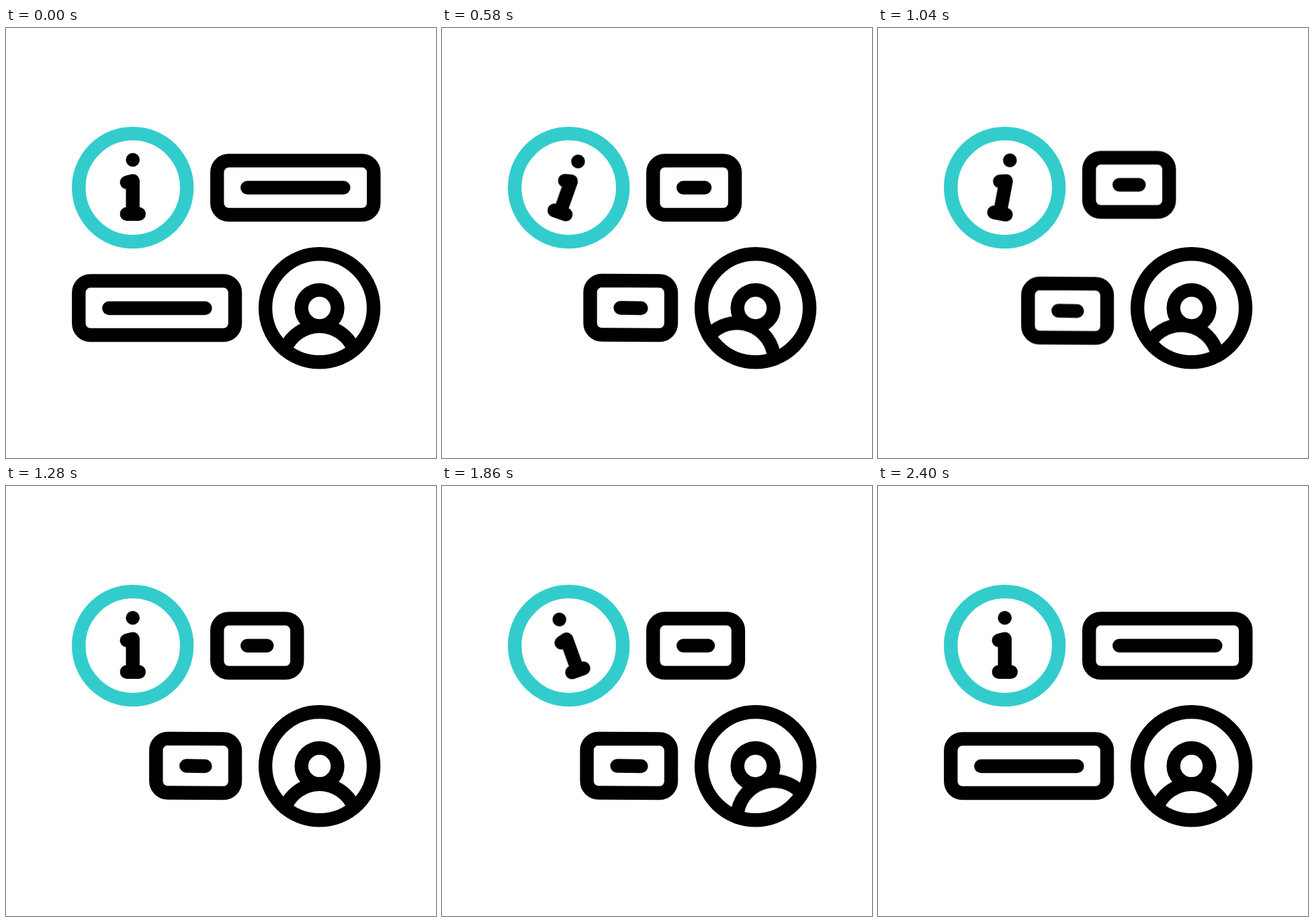
These frames come from a looping animation (640 px wide and 640 px high, 2.42 s). An HTML page without scripts:

```html
<!DOCTYPE html>
<html lang="en">
<head>
<meta charset="utf-8">
<title>Info and profile cards</title>
<style>
  html, body { margin: 0; width: 100%; height: 100%; overflow: hidden; background: #fff; }
  svg { display: block; width: 100%; height: 100%; }

  .line { fill: none; stroke: #000; stroke-width: 20.4; stroke-linecap: round; stroke-linejoin: round; }
  .accent { stroke: #3cc; }

  .sway, .bob, .card {
    animation: 2.42s cubic-bezier(.333, 0, .667, 1) infinite;
  }
  .sway { animation-name: sway; }
  .info { transform-origin: 188.7px 237.6px; }
  .person { transform-origin: 466.6px 416.8px; }
  .bob { animation-name: bob; }
  .upper { --lift: 6.2px; }
  .lower { --lift: -6.2px; }
  .upper .card { animation-name: shrink-right; }
  .lower .card { animation-name: shrink-left; }

  @keyframes sway {
    0%, 99.174%, 100% { transform: rotate(0deg); }
    26.446% { transform: rotate(20deg); }
    79.339% { transform: rotate(-20deg); }
  }
  @keyframes bob {
    0%, 26.446%, 72.727%, 100% { transform: translateY(0); }
    33.058%, 59.504% { transform: translateY(var(--lift)); }
    46.281% { transform: translateY(calc(-1 * var(--lift))); }
  }
  @keyframes shrink-right {
    0%, 99.174%, 100% {
      d: path("M331.5 197.4 L530 197.4 a17.3 17.3 0 0 1 17.3 17.3 v46 a17.3 17.3 0 0 1 -17.3 17.3 L331.5 278 a17.3 17.3 0 0 1 -17.3 -17.3 v-46 a17.3 17.3 0 0 1 17.3 -17.3 Z M359.2 237.6 L502.4 237.6");
    }
    26.446%, 72.727% {
      d: path("M331.5 197.4 L416 197.4 a17.3 17.3 0 0 1 17.3 17.3 v46 a17.3 17.3 0 0 1 -17.3 17.3 L331.5 278 a17.3 17.3 0 0 1 -17.3 -17.3 v-46 a17.3 17.3 0 0 1 17.3 -17.3 Z M359.2 237.6 L388.4 237.6");
    }
  }
  /* The moving side of the lower card rises a touch as it closes. */
  @keyframes shrink-left {
    0%, 99.174%, 100% {
      d: path("M125.6 376.4 L323.7 376.4 a17.3 17.3 0 0 1 17.3 17.3 v46 a17.3 17.3 0 0 1 -17.3 17.3 L125.6 457 a17.3 17.3 0 0 1 -17.3 -17.3 v-46 a17.3 17.3 0 0 1 17.3 -17.3 Z M153.3 417 L296.4 417");
    }
    26.446%, 72.727% {
      d: path("M240.6 375.9 L323.7 376.4 a17.3 17.3 0 0 1 17.3 17.3 v46 a17.3 17.3 0 0 1 -17.3 17.3 L240.6 456.5 a17.3 17.3 0 0 1 -17.3 -17.3 v-46 a17.3 17.3 0 0 1 17.3 -17.3 Z M268.3 416.5 L296.4 417");
    }
  }
</style>
</head>
<body>
<svg viewBox="0 0 640 640">
  <circle class="line accent" cx="188.7" cy="237.6" r="80.5"/>
  <g class="sway info">
    <circle cx="188.7" cy="196.2" r="10.3"/>
    <path class="line" d="M179.8 229.8 L188.7 227.6 V276.8 M179.8 276.8 H197.8"/>
  </g>

  <g class="bob upper"><path class="line card"/></g>
  <g class="bob lower"><path class="line card"/></g>

  <circle class="line" cx="466.6" cy="416.8" r="80.5"/>
  <circle class="line" cx="466.6" cy="416.8" r="26.9"/>
  <g class="sway person">
    <path class="line" d="M415.3 478.9 A55 55 0 0 1 517.9 478.9"/>
  </g>
</svg>
</body>
</html>
```
